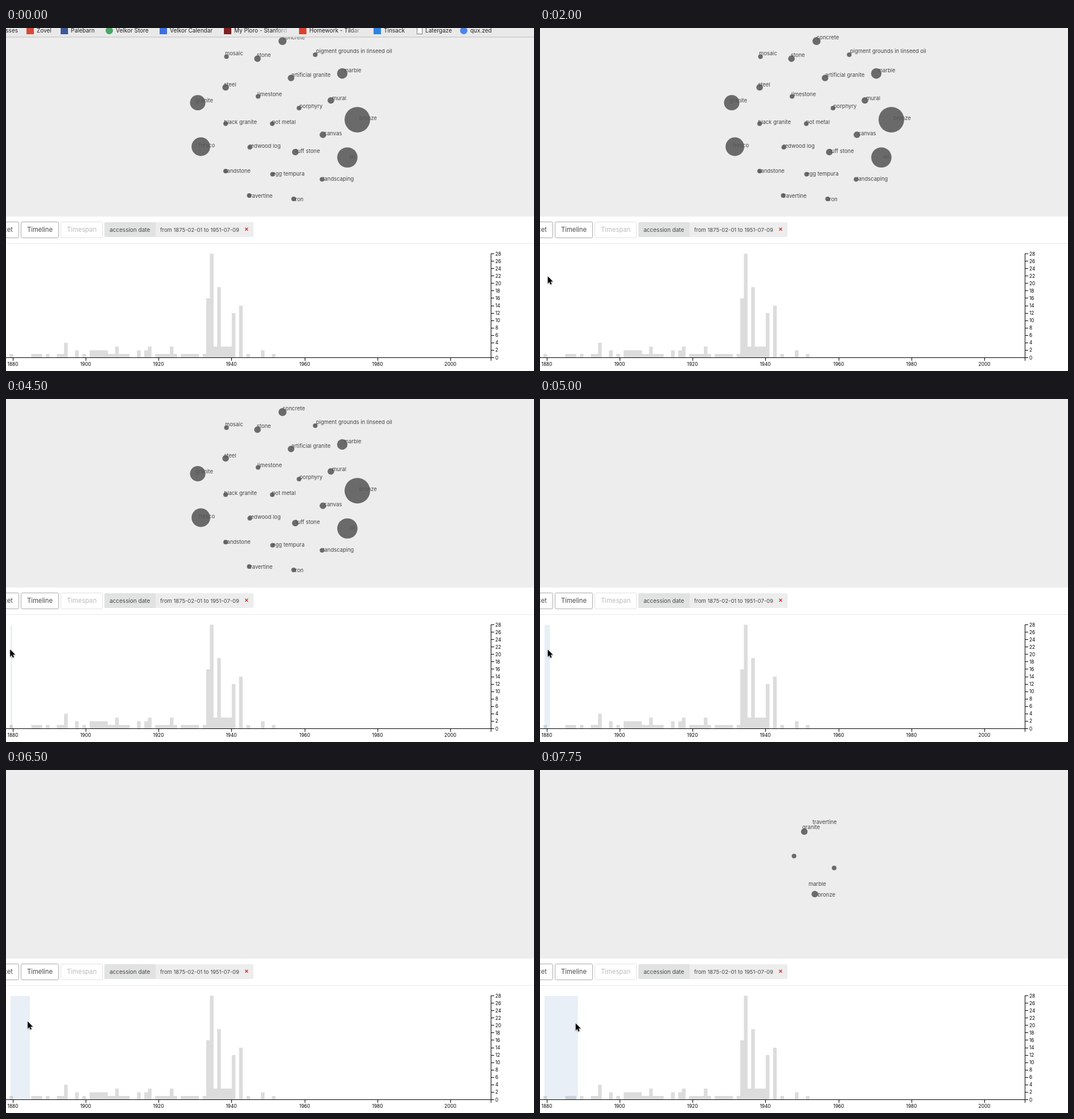
An HTML page that plays this animation: 928x604 px, repeating every 8 s.

```html
<!DOCTYPE html>
<html lang="en">
<head>
<meta charset="utf-8">
<title>Materials timeline</title>
<style>
  html, body { margin: 0; width: 100%; height: 100%; overflow: hidden; background: #fff; }
  svg { display: block; width: 100vw; height: 100vh; font-family: Inter, Roboto, sans-serif; }
  .node { fill: #555; fill-opacity: .86; }
  .label { fill: #444; font-size: 9.45px; }
  .axis { fill: none; stroke: #000; shape-rendering: crispEdges; }
  .tick { font-size: 8.3px; }
  .button { fill: #fff; stroke: #aaa; }
  .tool { fill: #484848; font-size: 11.25px; }
  .chip { fill: #484848; font-size: 10px; }
  .mark { fill: #222; font-size: 10px; }
  .off { stroke: #e2e2e2; }
</style>
</head>
<body>
<svg viewBox="0 0 928 604" preserveAspectRatio="none">
  <defs>
    <linearGradient id="fade">
      <stop offset="0" stop-color="#e9e9e9" stop-opacity="0"/>
      <stop offset="1" stop-color="#e9e9e9"/>
    </linearGradient>
  </defs>
  <rect width="928" height="332" fill="#ededed"/>
  <g id="graph"></g>
  <g id="regrown"></g>
  <g id="bookmarks"><rect width="928" height="16" fill="#e9e9e9"/><path d="M0 16H928" stroke="#bdbdbd"/></g>

  <rect class="button" x="-40.5" y="341.5" width="63" height="28" rx="2"/>
  <rect class="button" x="26.5" y="341.5" width="66" height="28" rx="2"/>
  <rect class="button off" x="96.5" y="341.5" width="73" height="28" rx="2"/>
  <text class="tool" x="12" y="359" text-anchor="end">Facet</text>
  <text class="tool" x="37" y="359">Timeline</text>
  <text class="tool" x="107" y="359" style="fill:#bbb">Timespan</text>
  <rect x="173" y="342" width="262" height="26" rx="2" fill="#ededed"/>
  <rect x="173" y="342" width="90" height="26" rx="2" fill="#e1e2e2"/>
  <text class="chip" x="182" y="358.5">accession date</text>
  <text class="chip" x="271" y="358.5" style="font-size:9.45px">from 1875-02-01 to 1951-07-09</text>
  <path d="M420.3 351.8l5 5m0-5l-5 5" stroke="#d8362a" stroke-width="1.5"/>
  <path d="M0 379.5H928" stroke="#e8e8e8"/>

  <path id="bars" fill="#dcdcdc"/>
  <rect id="brush" x="8" y="398" height="182" fill="steelblue" fill-opacity=".125"/>
  <g id="axes"></g>
  <path id="cursor" d="M0 0V12.8L2.9 10L4.8 14.4L6.8 13.5L5 9.2H9Z" stroke="#fff" paint-order="stroke" style="filter:drop-shadow(0 1px 1px #0005)"/>
</svg>
<script>
const $ = id => document.getElementById(id);
const set = (id, name, value) => $(id).setAttribute(name, value);
const lerp = (a, b, p) => a + (b - a) * p;
const label = (s, x, y) => `<text class="label" x="${x}" y="${y}">${s}</text>`;
const radius = count => 4.1 * Math.sqrt(count);
const dot = (x, y, r) => `<circle class="node" cx="${x}" cy="${y}" r="${r}"/>`;

// material, position, number of works
const materials = [
  ['concrete', 486, 23, 3], ['mosaic', 387.5, 50.5], ['stone', 442, 54, 2],
  ['pigment grounds in linseed oil', 543.5, 47], ['marble', 591, 80, 5],
  ['artificial granite', 501, 88, 2], ['steel', 386, 104.5, 2], ['limestone', 443, 120.5],
  ['granite', 337, 131.5, 11], ['mural', 571, 127.5, 2], ['porphyry', 515, 141],
  ['bronze', 617.5, 161.5, 30], ['black granite', 386, 168.5], ['pot metal', 468, 168.5],
  ['canvas', 557, 188, 2], ['fresco', 342.5, 209, 16], ['redwood log', 428.5, 210],
  ['tuff stone', 508.5, 218.5, 2], ['oil', 600, 228, 19], ['sandstone', 386, 252],
  ['egg tempura', 468.5, 257.5], ['landscaping', 555.5, 266.5],
  ['travertine', 427.5, 295], ['iron', 505.5, 301]
];
// labels sit slightly further from the centre than their dots
const pushOut = (v, centre) => v + (v - centre) * .026;
$('graph').innerHTML =
  materials.map(([s, x, y]) => label(s, pushOut(x, 487), pushOut(y, 155))).join('') +
  materials.map(([, x, y, count = 1]) => dot(x, y, radius(count))).join('');

// stretches of equal yearly counts: first year, length, count
const stretches = [
  [0, 1], [6, 3], [10, 1], [13, 2], [18, 1, 2], [20, 1], [22, 5, 2], [27, 6], [35, 1, 2],
  [37, 1, 2], [40, 6], [47, 5], [53, 1], [54, 7, 3], [65, 1], [69, 1, 2], [72, 1]
];
const peaks = { 15: 4, 29: 3, 38: 3, 44: 3, 54: 16, 55: 28, 57: 19, 61: 12, 63: 14 };
const years = Array(73).fill(0);
for (const [first, length, count = 1] of stretches) years.fill(count, first, first + length);
Object.assign(years, peaks);

const yearWidth = 6.407, unit = 183 / 28, base = 580.5;
set('bars', 'd', `M6 ${base}` + years.map((n, i) =>
  `V${base - n * unit}H${6 + (i + 1) * yearWidth}`).join('') + `V${base}Z`);

let lines = `M-5 ${base}H852.5V397.5M852.5 580V586`, numbers = '';
for (let year = 1880; year <= 2000; year += 20) {
  const x = Math.round(12 + (year - 1880) * yearWidth);
  lines += `M${x + .5} 580V586`;
  numbers += `<text class="tick" x="${x}" y="594.5" text-anchor="middle">${year}</text>`;
}
for (let n = 0; n <= 28; n += 2) {
  const y = base - n * unit;
  lines += `M852 ${Math.floor(y) + .5}H858`;
  numbers += `<text class="tick" x="860" y="${y + 3}">${n}</text>`;
}
$('axes').innerHTML = `<path class="axis" d="${lines}"/>` + numbers;

// title, text x, icon colour, round icon
const bookmarks = [
  ['Zovel', 54, '#d6493b'], ['Palebarn', 114, '#3b5998'], ['Velkor Store', 193, '#4aa567', true],
  ['Velkor Calendar', 288, '#3f6fd8'], ['My Ploro - Stanford', 401, '#7d2020'],
  ['Homework - Tildar', 533, '#d9412f'], ['Tinsack', 664, '#2f82e0'],
  ['Latergaze', 737, 'none'], ['qux.zed', 816, '#4f83e6', true]
];
$('bookmarks').innerHTML +=
  '<text class="mark" x="21" y="8" text-anchor="end">Classes</text>' +
  bookmarks.map(([s, x, color, round]) =>
    `<rect x="${x - 18}" y="-2" width="13" height="13" rx="${round ? 6.5 : 0}" fill="${color}"/>` +
    `<text class="mark" x="${x}" y="8">${s}</text>`).join('') +
  '<path d="M722.5-3V10.5H731.5V1L728-3" fill="#fff" stroke="#777"/>' +
  [472, 604].map(x => `<rect x="${x}" width="27" height="14" fill="url(#fade)"/>`).join('');

// pointer key points: time, x, y
const path = [
  [1250, 92, 396], [1750, 5, 442], [2000, 13.7, 437.3], [2500, 13.7, 437.3], [2750, 25, 438],
  [3250, 13.7, 439.3], [3750, 13.7, 439.3], [4250, 4, 441], [5000, 13.7, 441.3],
  [6000, 32.3, 442.3], [7250, 47, 443.3], [7750, 62.7, 446]
];
function pointerAt(t) {
  const i = path.findLastIndex(key => key[0] <= t);
  const [t0, x0, y0] = path[Math.max(i, 0)];
  const [t1, x1, y1] = path[i + 1] || path[i];
  const p = t1 > t0 ? (t - t0) / (t1 - t0) : 0;
  return [lerp(x0, x1, p), lerp(y0, y1, p)];
}

// material, label position, dot offset from it, number of works
const selected = [
  ['granite', 461, 104, 3.5, 4.5, 2], ['bronze', 488, 222.5, -5, -4, 2],
  ['travertine', 479, 95, -32.5, 56.5, 1], ['marble', 472, 204, 45, -31.5, 1]
];
function regrow(t) {
  const p = (t - 7250) / 500;
  if (p < 0) return '';
  const visible = selected.filter(row => p === 1 || row[5] > 1);
  const spread = visible.map(([s, x, y, dx, dy, count]) =>
    [s, lerp(480, x, .63 + .37 * p), lerp(161.5, y, .41 + .59 * p), dx, dy, count]);
  return spread.map(([s, x, y]) => label(s, x, y)).join('') +
    spread.map(([, x, y, dx, dy, count]) => dot(x + dx, y + dy, radius(count) * p)).join('');
}

function draw(t) {
  const [x, y] = pointerAt(t);
  set('cursor', 'transform', `translate(${x} ${y})`);
  set('cursor', 'visibility', t < 1250 ? 'hidden' : 'visible');
  set('brush', 'width', t > 4250 ? Math.max(0, x + 3.8 - 8) : 0);
  set('graph', 'opacity', Math.min(1, Math.max(0, (5000 - t) / 500)));
  set('bookmarks', 'visibility', t < 250 ? 'visible' : 'hidden');
  $('regrown').innerHTML = regrow(t);
}

const step = 250, start = performance.now();
let shown;
function tick() {
  const elapsed = (performance.now() - start) % 8000;
  const t = Math.floor(elapsed / step) * step;
  if (t !== shown) draw(shown = t);
  requestAnimationFrame(tick);
}
tick();
</script>
</body>
</html>
```
